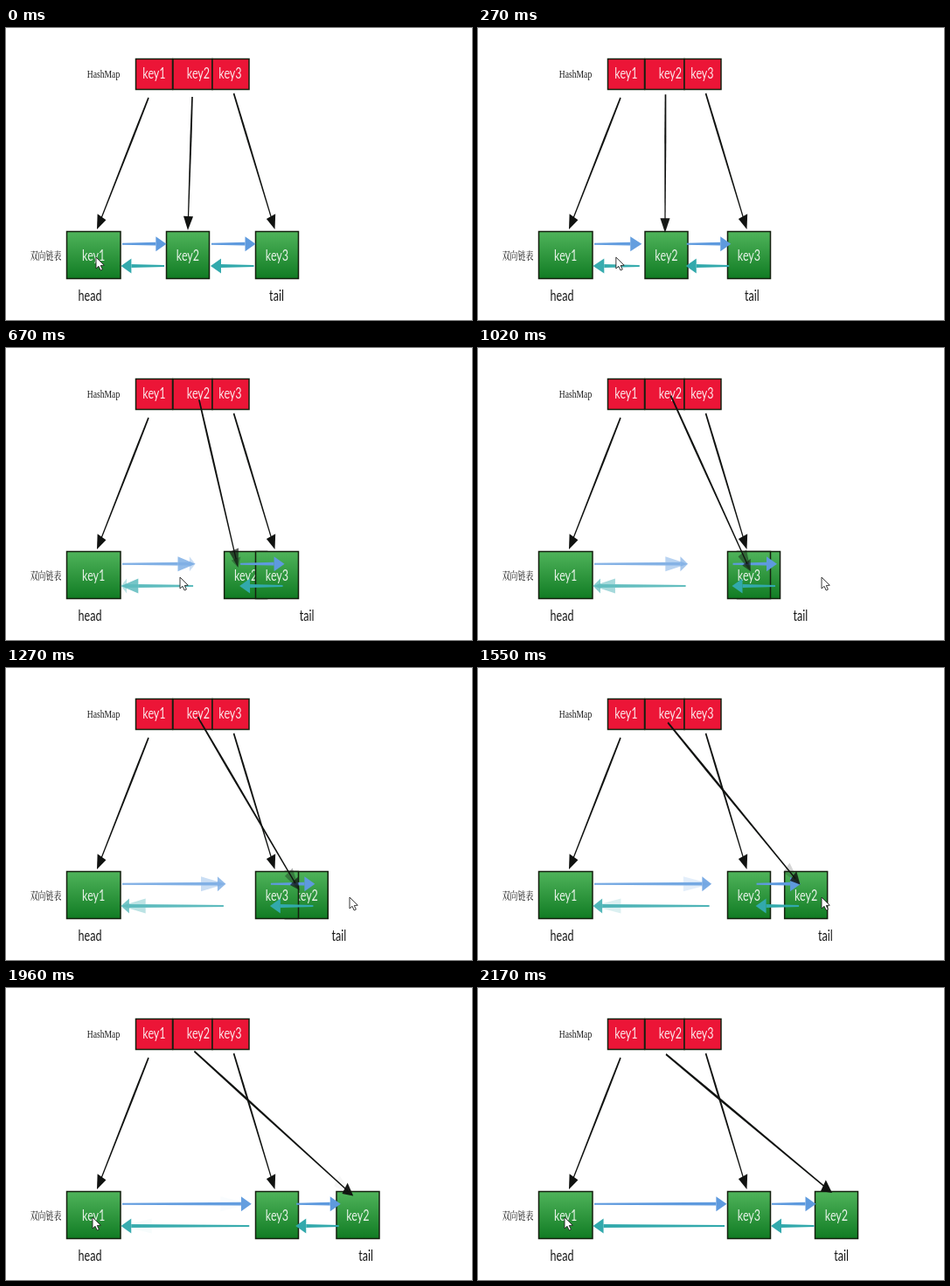
An HTML page with a canvas that plays this animation: 533x335 px, repeating every 2.21 s.

```html
<!DOCTYPE html>
<html lang="en">
<head>
<meta charset="utf-8">
<style>
html, body { margin: 0; width: 100%; height: 100%; overflow: hidden; background: #fff; }
canvas { display: block; }
</style>
</head>
<body>
<canvas id="stage" width="533" height="335"></canvas>
<script>
const ctx = document.getElementById('stage').getContext('2d');
const LOOP = 2210, STEPS = 33;
const SQUEEZE = .74; // the whole diagram is narrowed like a screen of another aspect ratio
const BLUE = '#5e9ade', TEAL = '#32a9ac', BLACK = '#101210', INK = '#161616';
const LABEL = '17px Lato, "Open Sans", sans-serif';
const SERIF = '13px "Liberation Serif", serif';
const HAN = '500 12px "Noto Serif CJK SC", "Noto Sans CJK SC", "Noto Sans CJK", sans-serif';

const lerp = (a, b, k) => a + (b - a) * k;
const clamp = k => Math.min(Math.max(k, 0), 1);

// Slow quadratic start for 7 steps, then a quick move that eases out
function progress(step) {
  if (step < 7) return .114 * (step / 7) ** 2;
  const k = clamp((step - 7) / 25);
  return lerp(.114, 1, 1 - (1 - k ** .8) ** 1.36);
}

// Drifts right, waits, jumps to the far side, then returns
function cursorX(step) {
  if (step < 15) return lerp(103, 199, clamp(step / 7));
  return lerp(393, 99, clamp((step - 23) / 5));
}

function polygon(points, fill) {
  ctx.beginPath();
  points.forEach(([x, y]) => ctx.lineTo(x, y));
  ctx.closePath();
  ctx.fillStyle = fill;
  ctx.fill();
}

function squeezed(x, y, paint) {
  ctx.save();
  ctx.translate(x, y);
  ctx.scale(SQUEEZE, 1);
  paint();
  ctx.restore();
}

function text(str, x, y, color, font = LABEL) {
  ctx.font = font;
  ctx.fillStyle = color;
  ctx.textAlign = 'center';
  ctx.textBaseline = 'middle';
  squeezed(x, y, () => ctx.fillText(str, 0, 0));
}

function box(x, y, w, h, fill) {
  ctx.fillStyle = fill;
  ctx.fillRect(x, y, w, h);
  ctx.strokeStyle = '#14200f';
  ctx.lineWidth = 1.5;
  ctx.strokeRect(x, y, w, h);
}

function entry(name, x, w, mid) {
  box(x, 35.5, w, 35, '#ec1537');
  text(name, mid, 53, '#fbe8ea');
}

function node(name, x, w) {
  const green = ctx.createLinearGradient(0, 233, 0, 288);
  green.addColorStop(0, '#50b45b');
  green.addColorStop(1, '#107b23');
  box(x + .5, 233.5, w, 54, green);
  text(name, x + w / 2 + .5, 262, '#e8f3e8');
}

function link(from, to, y, color, head = 12, alpha = 1) {
  const neck = to - Math.sign(to - from) * head;
  ctx.globalAlpha = alpha;
  polygon([[from, y - 1], [neck, y - 1.9], [neck, y + 1.9], [from, y + 1]], color);
  polygon([[neck, y - 8.5], [to, y], [neck, y + 8.5]], color);
  ctx.globalAlpha = 1;
}

// Cross-fades between the short and the long version, both stretched to fit
function fadeLink(from, to, y, color, p) {
  const size = Math.abs(to - from);
  link(from, to, y, color, 12 * size / 50, 1 - p);
  link(from, to, y, color, 12 * size / 150, p);
}

function span(x1, y1, x2, y2) {
  const dx = (x2 - x1) / SQUEEZE, dy = y2 - y1;
  return { x: (x1 + x2) / 2, y: (y1 + y2) / 2, length: Math.hypot(dx, dy), angle: Math.atan2(dy, dx) };
}

function blend(a, b, k) {
  return Object.fromEntries(Object.keys(a).map(key => [key, lerp(a[key], b[key], k)]));
}

function pointer({ x, y, length, angle }, heads = [[16, 1]]) {
  squeezed(x, y, () => {
    ctx.rotate(angle);
    ctx.translate(-length / 2, 0);
    const thick = length * .3, end = length - 10;
    polygon([[0, -1.1], [thick, -1.4], [end, -.8], [end, .8], [thick, 1.4], [0, 1.1]], BLACK);
    heads.forEach(([size, alpha]) => {
      ctx.globalAlpha = alpha;
      polygon([[length - size, -7.5], [length, 0], [length - size, 7.5]], BLACK);
    });
  });
}

function fadePointer(from, to, p) {
  const now = blend(from, to, p);
  pointer(now, [[16 * now.length / from.length, 1 - p], [16 * now.length / to.length, p]]);
}

function cursor(x, y) {
  polygon([[0, 0], [0, 13], [3, 10.3], [5.2, 15], [7.4, 14], [5.3, 9.5], [9.3, 9.2]]
    .map(([dx, dy]) => [x + dx, y + dy]), '#fff');
  ctx.strokeStyle = '#222';
  ctx.lineWidth = .9;
  ctx.stroke();
}

function draw(step) {
  const p = progress(step), shift = 101 * p;
  ctx.fillStyle = '#fff';
  ctx.fillRect(0, 0, 533, 335);

  text('HashMap', 111.5, 54, INK, SERIF);
  text('双向链表', 45.5, 261.5, INK, HAN);
  entry('key1', 148.5, 42, 169.5);
  entry('key2', 191, 45, 220);
  entry('key3', 236, 42, 256.5);

  node('key1', 69, 61.5);
  node('key2', 183 + 2 * shift, 49);
  node('key3', 285, 49);
  text('head', 96, 308, INK);
  text('tail', 309.5 + 1.05 * shift, 308, INK);

  fadeLink(133, 183.5 + shift, 247.7, BLUE, p);
  fadeLink(181 + shift, 131.5, 273, TEAL, p);
  link(235 + shift, 285.5 + shift, 247.7, BLUE);
  link(283.5 + shift, 234 + shift, 273, TEAL);

  pointer(span(163, 80, 104, 231));
  pointer(span(260.5, 75, 307.5, 231));
  fadePointer(span(213, 79, 208, 232), span(215, 76, 405, 235), p);
  cursor(cursorX(step), 263);
}

function frame() {
  draw(Math.floor(performance.now() % LOOP / LOOP * STEPS));
  requestAnimationFrame(frame);
}
frame();
</script>
</body>
</html>
```
